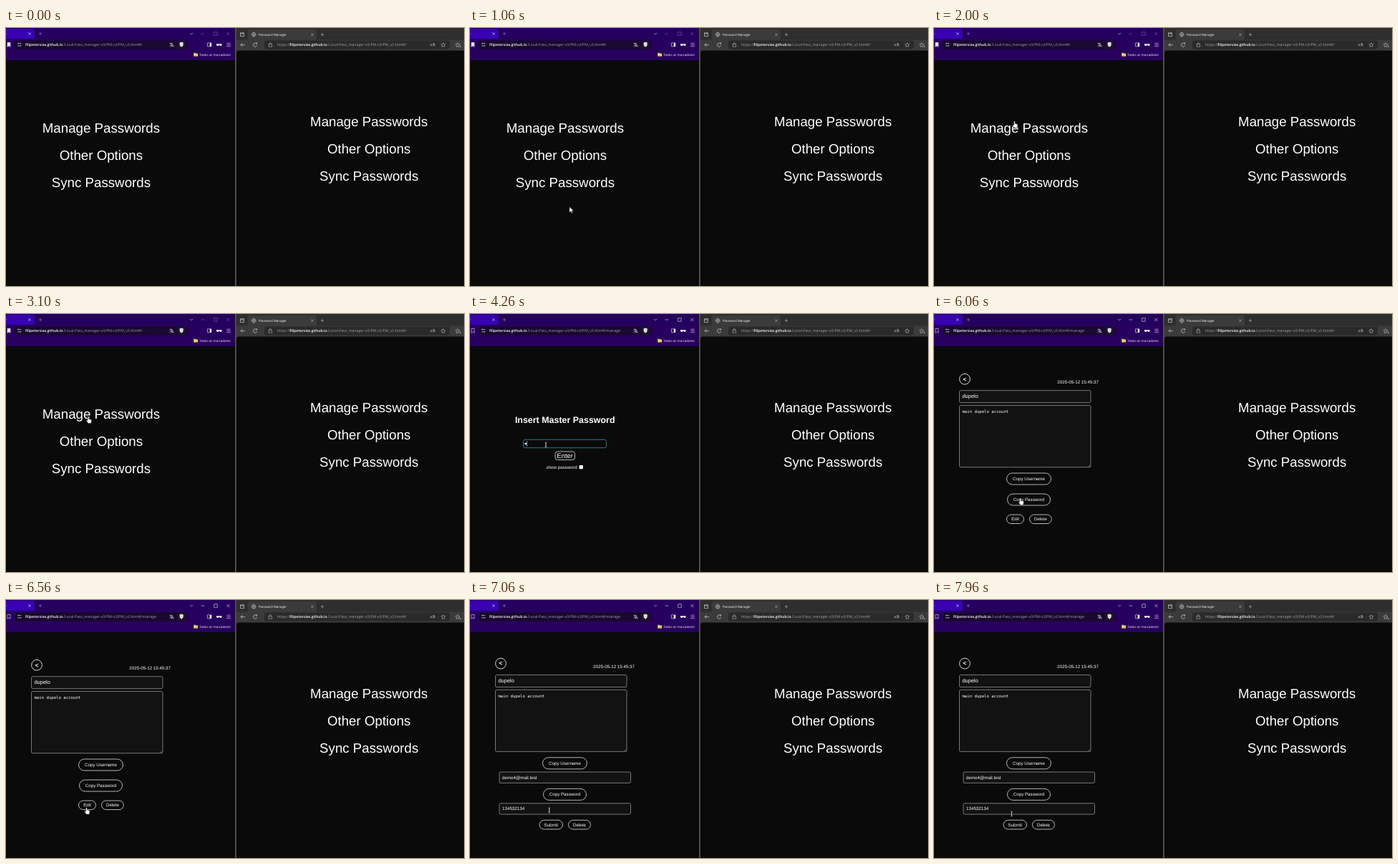
These frames come from a looping animation (640 by 360 pixels, 8 s). An HTML page:

```html
<!DOCTYPE html>
<html lang="en">
<head>
<meta charset="utf-8">
<title>Password Manager</title>
<style>
html, body { margin: 0; width: 100%; height: 100%; overflow: hidden; background: #0a0a0a; }
svg { display: block; width: 100vw; height: 100vh; }
text {
  font-family: "Liberation Sans", Arial, sans-serif; fill: #fff;
  white-space: pre; text-rendering: geometricPrecision;
}
.ui { font-family: "Open Sans", "Noto Sans", sans-serif; }
.mono { font-family: "DejaVu Sans Mono", monospace; }
.b { font-weight: 700; }
.host { font-weight: 600; }
.line { fill: none; stroke: #e4e4ea; stroke-width: .6; }
</style>
</head>
<body>
<svg id="stage" viewBox="0 0 640 360" preserveAspectRatio="none">
  <defs>
    <filter id="glow" x="-20%" y="-20%" width="140%" height="150%">
      <feDropShadow dx="0" dy="1.5" stdDeviation="2" flood-color="#1f8a94" flood-opacity=".4"/>
    </filter>
  </defs>
</svg>
<script>
const LOOP = 8000;
const HOST = "filipetorvias.github.io";
const PATH = "/Local-Pass_manager-v3/PM-v3/PM_v3.html#/";
const NAME = "dupelo";
const MENU = ["Manage Passwords", "Other Options", "Sync Passwords"];

// markup helpers
const text = (x, y, size, str, attrs = "") =>
  `<text x="${x}" y="${y}" font-size="${size}" ${attrs}>${str}</text>`;
const mid = (x, y, size, str, attrs = "") => text(x, y, size, str, 'text-anchor="middle" ' + attrs);
const rect = (x, y, w, h, fill, attrs = "") =>
  `<rect x="${x}" y="${y}" width="${w}" height="${h}" fill="${fill}" ${attrs}/>`;
const line = (d, attrs = "") => `<path class="line" d="${d}" ${attrs}/>`;
const group = (id, body) => `<g id="${id}">${body}</g>`;
const box = (x, y, w, h, fill = "#121212", stroke = "#a5a5a5") =>
  rect(x, y, w, h, fill, `rx="2" stroke="${stroke}" stroke-width=".7"`);
const button = (x, y, w, h, label, size = 6.22, r = h / 2) =>
  rect(x, y, w, h, "#0a0a0a", `rx="${r}" stroke="#eee" stroke-width=".75"`) +
  mid(x + w / 2, y + h / 2 + size * .34, size, label);
const cross = (x, y, s = 1.7) => `M${x - s} ${y - s}l${2 * s} ${2 * s}m0 ${-2 * s}l${-2 * s} ${2 * s}`;
const plus = (x, y) => `M${x - 2.2} ${y}h4.4M${x} ${y - 2.2}v4.4`;
const url = x => text(x, 25.2, 5.1, HOST, 'class="ui host"');
const menu = (x, y) => MENU.map((s, i) => mid(x, y + 38 * i, 18.72, s)).join("");

function leftWindow() {
  return rect(0, 0, 320, 15, "#24005f") + rect(0, 1, 40, 14, "#3700b3", 'rx="2"') +
    rect(0, 15, 320, 30, "#27005f") + rect(13, 17.5, 241, 12, "#19082f", 'rx="3"') +
    text(-.8, 9.6, 4.6, "r", 'class="ui"') + line(cross(33, 8)) +
    line(plus(48, 8), 'opacity=".6"') + line("M257.3 7l1.9 1.9 1.9-1.9") +
    group("controls", line("M272.500 8h5M290.700 5.700h4.600v4.600h-4.600z" + cross(310.500, 8, 2.2))) +
    group("mark", line("M2 20.300h4v6l-2-1.500-2 1.500z")) +
    line("M16 21.600h5.500M16 24.800h5.500M17.500 20.700v1.800M20 23.900v1.800") +
    url(27) + `<text id="path" class="ui" x="80" y="25.2" font-size="5.2" style="fill:#a69db2"></text>` +
    line("M228.500 21.500h4M230.500 20.500v1M232 21.500q-1 3-3.500 4M229.300 22.500l2 2.500M231 26.500l1.700-4 1.700 4m-2.700-1.200h2.200") +
    rect(239, 18, 12.500, 11, "#21122f", 'rx="2"') +
    '<path d="M242.500 20.500l2.700-1 2.700 1-.400 4-2.300 2.300-2.300-2.300z" fill="#ddd"/>' +
    line("M281.500 20.800h5.500v5h-5.500z") + rect(284.700, 21, 2.2, 4.800, "#eee") +
    '<path d="M294 22.300h7.500v1.500q-1.500 2.500-3 0h-1q-1.500 2.500-3.500 0z" fill="#fff"/>' +
    line("M308.300 21.300h5.500m-5.500 2.200h5.500m-5.500 2.200h5.500") +
    '<path d="M262.300 34.700h2.300l.700.900h2.800v4h-5.800z" fill="#f5d25f"/>' +
    text(270.300, 38.600, 4.4, "Todos os marcadores", 'class="ui"');
}

function rightWindow() {
  const dim = 'opacity=".75"';
  return rect(320, 0, 320, 360, "#4c4c4c") + rect(322, 0, 318, 17, "#2e2e2e") +
    rect(338, 2, 96, 16, "#3b3b3b", 'rx="3"') + rect(322, 16.500, 318, 16, "#3b3b3b") +
    rect(361, 17.500, 259, 12, "#2a2a2a", 'rx="3"') +
    rect(322, 31.500, 320, 330, "#0a0a0a", 'rx="3"') +
    line("M327.500 6.700h5v4.800h-5zM327.500 8h5") +
    line("M343.300 9.200a2.900 2.900 0 1 0 5.800 0a2.900 2.900 0 1 0-5.800 0h5.800M346.200 6.300q-2.500 2.900 0 5.800q2.500-2.900 0-5.800", dim) +
    text(353, 10.700, 4.4, "Password Manager", 'class="ui"') +
    line(cross(428, 9.200) + plus(442, 9.200), dim) +
    line("M334 23.500h-6m2.500-2.500l-2.500 2.500 2.500 2.500M350.300 21.800a2.700 2.700 0 1 0 .500 2.200M350.600 20v2h-2") +
    line("M367 22.700h4.600v3.500h-4.600zM368 22.700v-1a1.300 1.300 0 0 1 2.600 0v1", dim) +
    text(378.800, 25.300, 5.2, "https://", 'class="ui" style="fill:#a0a0a0"') + url(396.200) +
    text(449.300, 25.300, 5.2, PATH, 'class="ui" style="fill:#a0a0a0"') +
    text(592.500, 25.300, 5, "aあ", `class="ui" ${dim}`) +
    line("M611 20.500l.900 2 2.200.200-1.700 1.500.500 2.200-1.900-1.200-1.900 1.200.500-2.200-1.700-1.500 2.200-.200z", dim) +
    line("M631 20.500l.800 2 2.200.200-1.600 1.500.400 2.200-1.800-1.200-1.800 1.200.500-2.200-1.700-1.500 2.200-.200zM633.500 25h2.500m-2 1.500h2", dim) +
    menu(507.200, 137.200);
}

function login() {
  const dots = [0, 1, 2, 3].map(i => `<circle class="dot" cx="${77.600 + 3 * i}" cy="181" r="1.25" fill="#fff"/>`);
  return mid(132.700, 152, 12.450, "Insert Master Password", 'class="b"') +
    rect(74.500, 175.300, 116, 11.400, "#0a0a0a", 'id="field" rx="2" stroke-width=".8"') +
    dots.join("") + rect(0, 177.300, .6, 7.500, "#fff", 'id="caret"') +
    button(119, 191.900, 27.500, 11.600, "Enter", 9.33, 3.500) +
    text(106.500, 215.800, 6.22, "show password:") + rect(152.600, 211, 5.300, 5.300, "#fff", 'rx=".8"');
}

function list() {
  return mid(132.700, 83.300, 12.450, "Manage Passwords", 'class="b"') +
    box(74.500, 106.600, 116, 11.500, "#0a0a0a", "#a0a0a0") +
    text(76.300, 115.500, 9.33, "Search", 'style="fill:#777"') +
    button(107.500, 122.800, 50.800, 11.800, "Add record", 9.33, 3.500) +
    rect(62, 151, 141.500, 71.300, "#171717", 'stroke="#2f858d" stroke-width=".8" filter="url(#glow)"') +
    mid(132.700, 172.500, 9.33, NAME, 'class="b"') +
    mid(132.700, 185, 6.22, `main ${NAME} account`) +
    group("open", button(119, 206.200, 27.500, 11.600, "Open", 9.33, 3.500));
}

// dy lifts the head of the form slightly while editing
const head = dy => `<g transform="translate(0 ${dy})">` +
  '<circle cx="43" cy="90.800" r="7.400" fill="none" stroke="#eee" stroke-width=".9"/>' +
  mid(43, 93.700, 8.500, "&lt;", 'class="b"') + text(172.300, 96.800, 6.22, "2025-05-12 15:45:37") +
  box(35.500, 106.700, 183.500, 17) + text(39.400, 117.400, 7.500, NAME) +
  box(35.500, 127.500, 183.500, 86.300) +
  text(39.400, 138, 5.680, `main ${NAME} account`, 'class="mono"') +
  line("M218 210.500l-2.500 2.500m2.500-1l-1 1", 'opacity=".6"') +
  button(101.500, 222, 62, 16, "Copy Username") + "</g>";

const record = () => head(0) + button(102.500, 251, 60, 16, "Copy Password") +
  button(101.500, 280, 24, 12.500, "Edit") + button(133.500, 280, 30.800, 12.500, "Delete");

const edit = () => head(-2.200) +
  box(41, 240, 183.500, 15.300) + text(45, 249.500, 6.22, "demo4@mail.test") +
  button(102.500, 263.300, 60, 16, "Copy Password") +
  box(41, 283.700, 183.500, 15.300) + text(45, 293.200, 6.22, "134532134") +
  button(97, 307.200, 32.500, 12.700, "Submit") + button(137.500, 307.200, 31, 12.700, "Delete");

// each cursor has its hot spot at 0,0
const cursors = {
  arrow: '<path d="M0 0v8l1.900-1.800 1.300 2.900 1.200-.500-1.300-2.900h2.600z" fill="#fff" stroke="#222" stroke-width=".5"/>',
  hand: '<path d="M-.900.500q.900-1 1.700 0v3l3 .700q.900.300.800 1.300l-.600 2.500v1.500h-4.200l-2.500-3.700q0-1 1-.800l.800.700z" fill="#fff" stroke="#222" stroke-width=".5"/>',
  beam: line("M-1.400-3.400q1.400 0 1.400.700v5.400q0 .700-1.400.700M1.400-3.400q-1.400 0-1.400.700v5.400q0 .700 1.400.700")
};

const screens = { home: menu(132.900, 146.200), login: login(), list: list(), record: record(), edit: edit() };
const starts = { home: 0, login: 3340, list: 4660, record: 5480, edit: 6700 };
const typed = [4220, 4310, 4400, 4490];

// time, x, y
const track = [
  [400, 150, 358], [1200, 138, 240], [1900, 112.500, 130], [2300, 112.500, 130],
  [2900, 115, 143], [3360, 115, 143], [3760, 106, 182.500], [4720, 106, 182.500],
  [5200, 132.500, 212], [5640, 132.500, 212], [6400, 112.500, 289.500],
  [6860, 112.500, 289.500], [7300, 108.500, 298.300]
];

const stage = document.getElementById("stage");
stage.insertAdjacentHTML("beforeend", rect(0, 0, 640, 360, "#0a0a0a") + leftWindow() +
  Object.entries(screens).map(([id, body]) => group(id, body)).join("") + rightWindow() +
  group("pointer", Object.entries(cursors).map(([id, body]) => group(id, body)).join("")));

const $ = id => document.getElementById(id);
const show = (el, on) => { el.style.display = on ? "" : "none"; };

function pointerAt(t) {
  const i = track.findIndex(k => k[0] > t);
  if (i < 0) return track.at(-1).slice(1);
  const [t0, x0, y0] = track[Math.max(0, i - 1)], [t1, x1, y1] = track[i];
  const u = Math.max(0, Math.min(1, (t - t0) / (t1 - t0 || 1)));
  const e = u * u * (3 - 2 * u);
  return [x0 + (x1 - x0) * e, y0 + (y1 - y0) * e];
}

function cursorFor(screen, y) {
  const within = (a, b) => y >= a && y <= b;
  if (screen === "home") return within(128, 150) || within(167, 188) || within(205, 226) ? "hand" : "arrow";
  if (screen === "login") return within(175, 187) ? "beam" : "arrow";
  if (screen === "list") return within(206, 218) ? "hand" : "arrow";
  if (screen === "record") return within(280, 293) || within(222, 238) || within(251, 267) ? "hand" : "arrow";
  return within(283, 300) ? "beam" : "arrow";
}

function draw(t) {
  const screen = Object.keys(starts).filter(k => t >= starts[k]).pop();
  for (const id in screens) show($(id), id === screen);
  const active = screen !== "home";
  $("controls").setAttribute("opacity", active ? 1 : .45);
  $("mark").firstChild.style.fill = active ? "none" : "#e4e4ea";
  $("path").textContent = PATH + (active ? "manage" : "");

  const focused = t >= 3860;
  const count = typed.filter(k => t >= k).length;
  $("field").setAttribute("stroke", focused ? "#2f97a5" : "#a0a0a0");
  document.querySelectorAll(".dot").forEach((dot, i) => show(dot, i < count));
  show($("caret"), focused);
  $("caret").setAttribute("x", 76.200 + 3 * count);

  const [x, y] = pointerAt(t), kind = cursorFor(screen, y);
  show($("pointer"), t >= track[0][0]);
  $("pointer").setAttribute("transform", `translate(${x} ${y})`);
  for (const id in cursors) show($(id), id === kind);

  const hover = screen === "list" && kind === "hand";
  const [back, label] = $("open").children;
  back.setAttribute("fill", hover ? "#fff" : "#0a0a0a");
  label.style.fill = hover ? "#14324a" : "#fff";
}

function tick(now) {
  draw(now % LOOP);
  requestAnimationFrame(tick);
}
draw(0);
requestAnimationFrame(tick);
</script>
</body>
</html>
```
